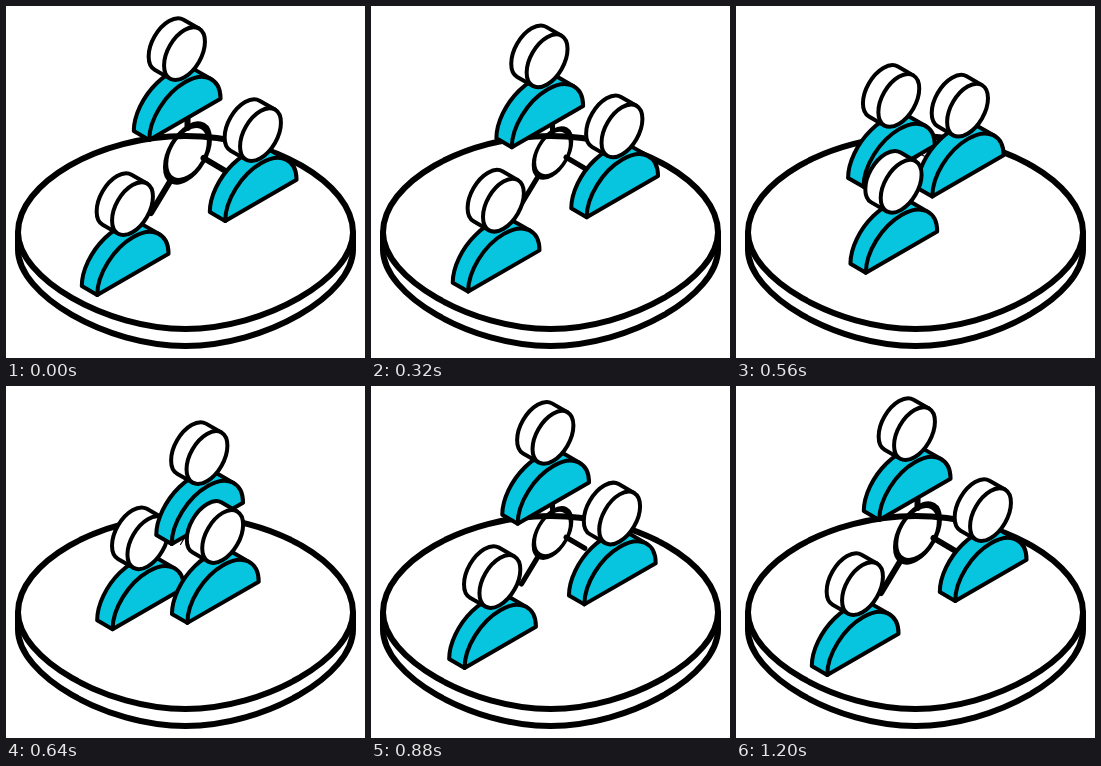
Recreate the animation shown at these times as an HTML page. Size 359x352 px, loop 1220 ms.

```html
<!DOCTYPE html>
<html lang="en">
<head>
<meta charset="utf-8">
<title>Rotating team</title>
<style>
  html, body { margin: 0; width: 100%; height: 100%; overflow: hidden; background: #fff; }
  svg { display: block; width: 100vw; height: 100vh; }
  .ink { stroke: #000; stroke-width: 4; stroke-linejoin: round; stroke-linecap: round; }
  #disc { stroke-width: 6; }
  #hub { stroke-width: 6; }
  #people path, #people circle { vector-effect: non-scaling-stroke; }
  .white { fill: #fff; }
  .cyan { fill: #07c5df; }
</style>
</head>
<body>
<svg viewBox="0 0 359 352">
  <g id="disc" class="ink" fill="none"></g>
  <g id="hub" class="ink" fill="none"></g>
  <g id="people" class="ink"></g>
</svg>
<script>
const LOOP = 1220, MOVE = 1200;
const ISO = 'matrix(.866 -.5 0 1 ';
const $ = id => document.getElementById(id);

// Platform: top face, slightly pointed towards the front, plus a lower rim
function drawDisc(cx, cy, rx, ry, depth) {
  const l = cx - rx, r = cx + rx;
  const half = (y, s, k) =>
    `C${l} ${y + s * ry * k} ${cx - rx * k} ${y + s * ry} ${cx} ${y + s * ry}` +
    `S${r} ${y + s * ry * k} ${r} ${y}`;
  const back = half(cy, -1, 0.515), front = half(cy, 1, 0.475);
  const rim = half(cy + depth, 1, 0.475);
  $('disc').innerHTML =
    `<path d="M${l} ${cy}V${cy + depth}${rim}V${cy}"/>` +
    `<path d="M${l} ${cy}${back}M${l} ${cy}${front}"/>`;
}

// Ring with three spokes, centred on its own origin
function drawHub() {
  $('hub').innerHTML =
    `<g transform="${ISO}0 0)"><circle r="25.3"/></g>` +
    '<path d="M-16 26L-36.5 60M16 5L38 18M0 -25V-39"/>';
}

// Extruded figure; origin is the lower front corner of the body
function figure() {
  const R = 41.2, f = 0.9, H = R * f, r = 23.6, d = 17.8;
  const n = Math.hypot(1, f), tx = R + R / n, ty = -H * f / n;
  const h = r * Math.SQRT1_2;
  return `<g transform="${ISO}0 0)" class="cyan">` +
    `<path d="M0 0L${-d} ${-d}A${R} ${H} 0 0 1 ${tx - d} ${ty - d}L${tx} ${ty}Z"/>` +
    `<path d="M0 0A${R} ${H} 0 0 1 ${2 * R} 0Z"/></g>` +
    `<g transform="${ISO}35.3 -86.4)" class="white">` +
    `<path d="M${h} ${-h}l${-d} ${-d}A${r} ${r} 0 0 0 ${-h - d} ${h - d}l${d} ${d}Z"/>` +
    `<circle r="${r}"/></g>`;
}

// Symmetric ease: cubic-bezier(a, 0, 1 - a, 1)
function ease(x) {
  const a = 0.88;
  let lo = 0, hi = 1;
  for (let i = 0; i < 24; i++) {
    const s = (lo + hi) / 2, n = 1 - s;
    const bx = 3 * a * s * n * n + 3 * (1 - a) * s * s * n + s * s * s;
    if (bx < x) lo = s; else hi = s;
  }
  return lo * lo * (3 - 2 * lo);
}

const rear = [143.2, 134], right = [219.2, 215], left = [91.2, 289];
const routes = [[rear, left], [right, rear], [left, right]];

drawDisc(179.5, 226.5, 167.5, 96.5, 17);
drawHub();
$('people').innerHTML = routes.map(() => `<g>${figure()}</g>`).join('');
const people = [...$('people').children];

function render(t) {
  const u = Math.min(t / MOVE, 1), p = u <= 0 ? 0 : u >= 1 ? 1 : ease(u);
  routes.forEach(([a, b], i) => {
    const x = a[0] + (b[0] - a[0]) * p, y = a[1] + (b[1] - a[1]) * p;
    people[i].setAttribute('transform', `translate(${x} ${y})`);
  });
  const size = 1 - Math.pow(1 - Math.abs(2 * u - 1), 3);
  $('hub').setAttribute('transform', `translate(181.5 147) scale(${size})`);
}

const start = performance.now();
function tick() {
  render((performance.now() - start) % LOOP);
  requestAnimationFrame(tick);
}
tick();
</script>
</body>
</html>
```
